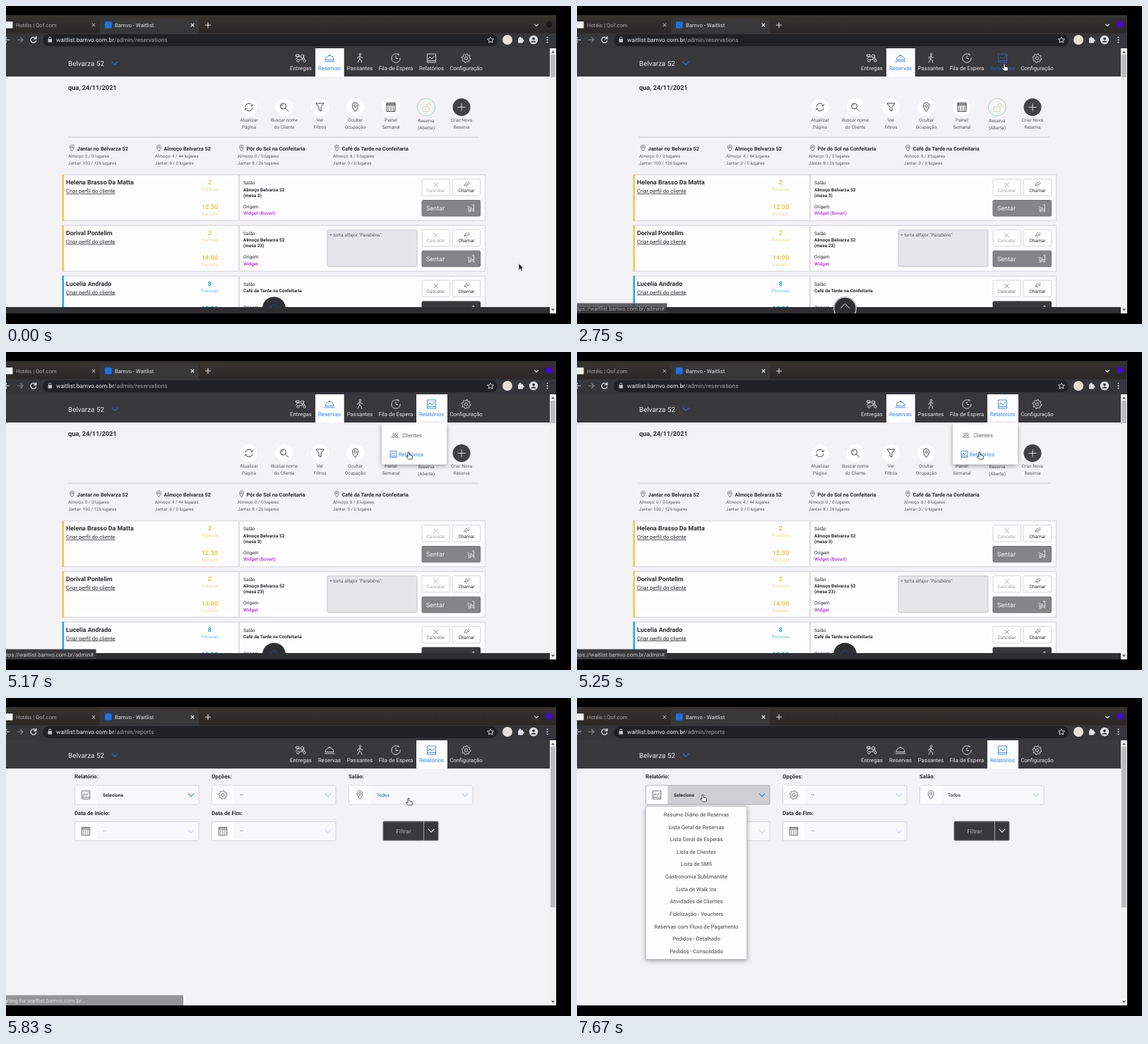
Animation, 800 px wide and 451 px high, one loop 8000 ms. Source, as an HTML page:

```html
<!DOCTYPE html>
<html lang="pt-BR">
<head>
<meta charset="utf-8">
<title>Waitlist</title>
<style>
html, body { margin: 0; height: 100%; overflow: hidden; background: #000; }
svg { display: block; }
text { font-family: Roboto, "Open Sans", sans-serif; text-rendering: geometricPrecision; white-space: pre; }
.shadow { filter: drop-shadow(0 2px 3px rgba(0,0,0,.35)); }
</style>
</head>
<body>
<svg width="800" height="451" viewBox="0 0 800 451">
  <clipPath id="view"><rect y="60" width="770" height="376"/></clipPath>
  <linearGradient id="strip" x2="0" y2="1"><stop stop-color="#37332f"/><stop offset="1" stop-color="#2a2725"/></linearGradient>
  <g id="chrome"></g>
  <g id="page" clip-path="url(#view)"></g>
  <g id="over"></g>
</svg>
<script>
const LOOP = 8000, NAV = 5540, LOADED = 5790;
const DARK = '#39383b', BLUE = '#2a80ff', INK = '#2c2b2e', GREY = '#5a595d', LINE = '#d6d5da';
const HOST = 'waitlist.bamvo.com.br', VENUE = 'Belvarza 52';

// Timing
const ease = (t, a, b) => {
  const u = Math.min(1, Math.max(0, (t - a) / (b - a)));
  return u * u * (3 - 2 * u);
};
const mix = (a, b, k) => '#' + [1, 3, 5].map(i => {
  const [p, q] = [a, b].map(c => parseInt(c.slice(i, i + 2), 16));
  return Math.round(p + (q - p) * k).toString(16).padStart(2, '0');
}).join('');

// Drawing
const text = (x, y, s, size, fill = INK, weight = 400, anchor = 'start', extra = '') =>
  `<text x="${x}" y="${y}" font-size="${size}" fill="${fill}" font-weight="${weight}" text-anchor="${anchor}" ${extra}>${s}</text>`;
const mid = (x, y, s, size, fill, weight) => text(x, y, s, size, fill, weight, 'middle');
const rect = (x, y, w, h, fill, extra = '') =>
  `<rect x="${x}" y="${y}" width="${w}" height="${h}" fill="${fill}" ${extra}/>`;
const box = (x, y, w, h, fill, stroke = LINE, rx = 1.5) =>
  rect(x + .5, y + .5, w - 1, h - 1, fill, `stroke="${stroke}" rx="${rx}"`);
const disc = (x, y, r, fill, extra = '') => `<circle cx="${x}" cy="${y}" r="${r}" fill="${fill}" ${extra}/>`;
const group = (opacity, s) => opacity > 0 ? `<g opacity="${opacity.toFixed(2)}">${s}</g>` : '';

const ring = (r, x = 0, y = 0) => `M${x - r} ${y}a${r} ${r} 0 1 0 ${2 * r} 0a${r} ${r} 0 1 0 ${-2 * r} 0`;
const cog = 'M' + Array.from({ length: 32 }, (_, i) => {
  const a = (i + .5) * Math.PI / 16, r = i % 4 < 2 ? 6.4 : 4.9;
  return `${(r * Math.cos(a)).toFixed(1)} ${(r * Math.sin(a)).toFixed(1)}`;
}).join('L') + 'Z';
const dots = y => `M-4.4 ${y}h2m1.4 0h2m1.4 0h2`;
const ICONS = {
  scooter: ring(1.7, -4, 3.5) + ring(1.7, 5, 3.5) + 'M-7 1.5Q-6-2-3-2H1L2 2H-2.3M2 2L4.5-4H2.5M5 1.5L4-2M-7-5H-2.5V-2.5H-7ZM-1-2.5L1-5H3',
  cloche: 'M-6 2.5A6 6 0 0 1 6 2.5ZM-7.3 4.8H7.3M-1-3.6A1 1 0 0 1 1-3.6',
  walker: ring(1.3, .5, -5.5) + 'M.3-3.6L-.3 1L-3 6.5M-.3 1L2 3L2.8 6.5M.3-3.4L-2.6-1.4L-3.2 1M.6-3L2.2-1L4-.4',
  clock: 'M3-5.4A6.2 6.2 0 1 0 6.2-.5M3-7V-5H5.2M0-3.5V.5H3',
  chart: 'M-6-6H6V6H-6ZM-6 3.6H6M-4.5 1.5L-2.5-2L.5 1L4.5-3.5',
  gear: cog + ring(2.2),
  refresh: 'M-5.2-1A5.3 5.3 0 0 1 4.6-2.6M5.2 1A5.3 5.3 0 0 1-4.6 2.6M3-2.2L5-2L5.6-4M-3 2.2L-5 2L-5.6 4',
  search: ring(4, -1.5, -1.5) + 'M1.5 1.5L6 6M-3.5-2A2.2 2.2 0 0 1-1.5-3.8',
  filter: 'M-5.5-5.5H5.5L1.5 0V5.5L-1.5 4V0Z',
  pin: 'M0 6.2C-6-.8-4.8-6.2 0-6.2S6-.8 0 6.2Z' + ring(1.7, 0, -1.8),
  calendar: 'M-6-6H6V6H-6ZM-6-2.8H6M-6-4.4H6' + dots(-.4) + dots(1.8) + dots(4),
  lock: 'M-5-.5H4V6H-5ZM1-.5V-3A2.7 2.7 0 0 1 6.2-3V-1M-.5 2V4',
  plus: 'M-5.5 0H5.5M0-5.5V5.5',
  cross: 'M-3-3L3 3M3-3L-3 3',
  bell: 'M-4 2L0-4L4 0ZM-1 3L1 4M3-4L5-5M4-2H6',
  chair: 'M5-6V1H-1M5 1V6M-1 1V6M-1 3.5H5M-5-3L-1-1H2M-5 0L-3 1V6M2-5L5-6',
  people: ring(2, -2.5, -2) + ring(2, 2.5, -2) + 'M-6 4Q-5.5 1-2.5 1T1 4ZM2 1Q5.5 1 6 4H1',
  down: 'M-4.2-2.1L0 2.1L4.2-2.1',
  up: 'M-6.500 3.300L0-3.300L6.500 3.300'
};
const icon = (name, x, y, color, scale = 1, width = .9) =>
  `<path transform="translate(${x} ${y}) scale(${scale})" d="${ICONS[name]}" fill="none" stroke="${color}" stroke-width="${width}"/>`;
const stroke = (d, color, width = 1.2) => `<path d="${d}" fill="none" stroke="${color}" stroke-width="${width}"/>`;

function browser(path, live, thumb) {
  const soft = '#dfe1e5';
  return rect(0, 13, 779, 26, 'url(#strip)')
    + '<path d="M130 39Q133 39 133 36V20Q133 16.500 137 16.500H269Q273 16.500 273 20V36Q273 39 276 39Z" fill="#383839"/>'
    + rect(0, 38.5, 779, 21.5, '#35363a')
    + rect(0, 22, 9.5, 9.5, '#f4f4f4') + text(14, 29.5, 'Hotéis | Qof.com', 7.7, '#a3a6aa')
    + rect(140, 22, 9.5, 9.5, '#1a73e8', 'rx="1.500"') + text(154, 29.5, 'Bamvo - Waitlist', 7.7, soft)
    + icon('cross', 124, 27, '#b0b2b5', .75, 1.4) + icon('cross', 264, 27, soft, .75, 1.5)
    + icon('plus', 286, 27, soft, .7, 1.6) + icon('down', 751, 27, soft, .7, 1.5)
    + disc(769, 25.8, 4.4, live ? '#4400f5' : '#17171a')
    + stroke('M-3 48H5.500M1 44.500L-3 48L1 51.500', soft)
    + stroke('M16 48H24M20.500 44.500L24 48L20.500 51.500', '#85878b')
    + stroke('M42 45.500A4 4 0 1 0 42.800 49M42.800 43V46.500H39.300', soft, 1.3)
    + rect(52, 40, 644, 17, '#202124', 'rx="8.500"')
    + rect(59.5, 47, 5.5, 4.5, '#c3c5c9') + stroke('M60.700 47V45.500A1.550 1.550 0 0 1 63.800 45.500V47', '#c3c5c9', 1)
    + text(71, 51, `${HOST}<tspan fill="#a0a3a8">/admin/${path}</tspan>`, 8.3, '#eceef1')
    + stroke('M686 43.800L687.300 46.700L690.500 47L688 49L688.800 52L686 50.400L683.200 52L684 49L681.500 47L684.700 46.700Z', soft, .9)
    + disc(710, 48, 7, '#e6e1d6')
    + rect(725, 45.5, 7, 7, soft, 'rx="1"') + disc(728, 45, 1.5, soft) + disc(732.3, 49, 1.5, soft)
    + disc(747, 48, 6.2, soft) + disc(747, 46.3, 1.9, '#35363a')
    + '<path d="M743 51.500Q747 46.800 751 51.500Z" fill="#35363a"/>'
    + [44.5, 48, 51.5].map(y => disc(766.5, y, 1, soft)).join('')
    + rect(770, 60, 9, 376, '#f1f1f2') + rect(771, 69, 7, thumb, '#bcbcbf')
    + '<path d="M772 66.500H777L774.500 63.500ZM772 429.500H777L774.500 432.500Z" fill="#555"/>';
}

const NAV_ITEMS = [
  ['Entregas', 417.5, 'scooter'], ['Reservas', 458, 'cloche'], ['Passantes', 501, 'walker'],
  ['Fila de Espera', 552, 'clock'], ['Relatórios', 602.5, 'chart'], ['Configuração', 651.5, 'gear']
];
function header(active, hover = 0, lit = 0) {
  return rect(0, 60, 770, 40, DARK) + text(88, 85, VENUE, 9.9, '#e6e6e8') + icon('down', 154, 81, '#2470e6', 1, 1.3)
    + NAV_ITEMS.map(([label, x, name]) => {
      const on = label === active, tab = label === 'Relatórios';
      const back = on ? 1 : tab ? lit : 0;
      const color = on ? BLUE : tab ? mix('#e8e8ea', mix('#1c5ccc', BLUE, lit), hover) : '#e8e8ea';
      return group(back, rect(x - (tab ? 21.5 : 20), 60, tab ? 44 : 40.7, 40, '#fefefe'))
        + icon(name, x, 74, color) + mid(x, 91, label, 7.85, color);
    }).join('');
}

const ACTIONS = [
  [344, 'refresh', 'Atualizar', 'Página'], [394, 'search', 'Buscar nome', 'do Cliente'], [444.5, 'filter', 'Ver', 'Filtros'],
  [494.5, 'pin', 'Ocultar', 'Ocupação'], [545, 'calendar', 'Painel', 'Semanal'], [595, 'lock', 'Reserva', '(Aberta)'],
  [645, 'plus', 'Criar Nova', 'Reserva']
];
const action = ([x, name, a, b]) => {
  const lock = name === 'lock', plus = name === 'plus', dy = lock ? 1 : 0;
  return disc(x, 143.5, 12.5, plus ? '#424144' : lock ? '#f3f6f3' : '#fff', lock ? 'stroke="#a9d6c6"' : '')
    + icon(name, x, 143.5, lock ? '#cfdcb0' : plus ? '#e8e8ea' : INK)
    + mid(x, 164 + dy, a, 6.5, GREY) + mid(x, 174 + dy, b, 6.5, GREY);
};

const HALLS = [
  [88, 'Jantar no ' + VENUE, '0 / 0', '100 / 126'], [211, 'Almoço ' + VENUE, '4 / 44', '0 / 0'],
  [328, 'Pôr do Sol na Confeitaria', '0 / 0', '8 / 26'], [463, 'Café da Tarde na Confeitaria', '8 / 8', '0 / 0']
];
const hall = ([x, name, lunch, dinner]) => icon('pin', x + 5.5, 201.5, GREY, .7, 1.1)
  + text(x + 12.5, 204.5, name, 7.4, INK, 700)
  + text(x, 215, `Almoço: ${lunch} lugares`, 6.15, GREY) + text(x, 225, `Jantar: ${dinner} lugares`, 6.15, GREY);

const CARDS = [
  { y: 239, name: 'Helena Brasso Da Matta', seats: 2, time: '12:30', place: 'Almoço ' + VENUE, table: '(mesa 3)', from: 'Widget (Bovari)' },
  { y: 310.7, name: 'Dorival Pontelim', seats: 2, time: '14:00', place: 'Almoço ' + VENUE, table: '(mesa 23)', from: 'Widget', note: '+ torta alfajor "Parabéns"' },
  { y: 382.5, name: 'Lucelia Andrado', seats: 8, time: '15:00', place: 'Café da Tarde na Confeitaria', table: '', from: '', open: true }
];
const card = c => {
  const tone = c.open ? '#27a9e0' : '#f3c946', pale = c.open ? '#6fc3e6' : '#f6dc8c', faded = c.open ? '#77767a' : '#a9a8ac';
  return `<g transform="translate(0 ${c.y})">`
    + rect(80.5, .5, 598, 65, '#fdfdfe', 'stroke="#dedde2" stroke-width="1.500"') + rect(79.5, 0, 2.6, 66, tone)
    + rect(329, 0, 2, 66, '#dedde2')
    + text(85, 14, c.name, 8.85, INK, 700)
    + text(85, 26, 'Criar perfil do cliente', 7.6, INK, 400, 'start', 'text-decoration="underline"')
    + mid(288.5, 14, c.seats, 9.2, tone, 700) + mid(288.5, 23, 'Pessoas', 6.5, pale)
    + mid(288.5, 49, c.time, 9, tone, 700) + mid(288.5, 58, 'Sentado', 6.5, pale)
    + text(336, 14, 'Salão', 6.7, INK) + text(336, 23.5, c.place, 6.5, INK, 700) + text(336, 31.5, c.table, 6.5, INK, 700)
    + text(336, 47.5, 'Origem', 6.7, INK) + text(336, 57, c.from, 6.6, '#c544ec', 700)
    + (c.note ? box(454.5, 6.5, 128, 52.5, '#e6e5e8', '#c3c2c7') + text(458, 16.5, c.note, 6.65, GREY) : '')
    + box(588.5, 6, 40.5, 24.5, '#fefefe') + icon('cross', 608.5, 14.5, faded) + mid(608.5, 24.5, 'Cancelar', 6.6, faded)
    + box(631.5, 6, 40.5, 24.5, '#fefefe') + icon('bell', 652, 14, GREY, .8) + mid(652, 24.5, 'Chamar', 6.6, INK)
    + box(588.5, 36, 83.5, 23.5, c.open ? DARK : '#858487', c.open ? DARK : '#737276')
    + text(595, 51.3, 'Sentar', 9, '#f4f4f5') + icon('chair', 658, 48, '#f4f4f5', .9) + '</g>';
};
const LIST = rect(0, 60, 770, 376, '#f3f2f5') + text(88, 118.5, 'qua, 24/11/2021', 9.2, INK, 700)
  + ACTIONS.map(action).join('') + rect(88, 185.5, 582, 1, '#c9c8cd') + HALLS.map(hall).join('') + CARDS.map(card).join('');

function listPage(t, y) {
  const lit = ease(t, 2760, 2920);
  const white = ease(t, 250, 650) * (1 - ease(t, 3040, 3350));
  const halo = ease(t, 540, 660) * (1 - ease(t, 3900, 4500));
  const entry = (name, label, ix, tx, cy, on) =>
    icon(name, ix, cy, on ? BLUE : '#77767a', .75, 1.1) + text(tx, cy + 3, label, 7.8, on ? BLUE : '#66656a');
  return LIST + header('Reservas', ease(t, 2480, 2790), lit)
    + rect(0, 427, 770, 9, '#2f2e31') + disc(379.5, 429, 16.5, '#2f2e31')
    + group(halo, disc(379.5, 429, 15.7, 'none', 'stroke="#f0f0f2" stroke-width="1.100"'))
    + icon('up', 379.5, 425.5, mix('#1c4796', '#f0f0f2', white), 1, 1)
    + group(lit, rect(532, 100, 92, 59.5, '#fefefe', 'class="shadow"')
      + entry('people', 'Clientes', 551, 561, 118, y > 107 && y < 131)
      + entry('chart', 'Relatórios', 548.5, 556, 145, y >= 131));
}

const REPORTS = ['Resumo Diário de Reservas', 'Lista Geral de Reservas', 'Lista Geral de Esperas', 'Lista de Clientes', 'Lista de SMS',
  'Gastronomia Sublimantité', 'Lista de Walk Ins', 'Atividades de Clientes', 'Fidelização - Vouchers',
  'Reservas com Fluxo de Pagamento', 'Pedidos - Detalhado', 'Pedidos - Consolidado'];
const field = (x, y, label, name, value, color, arrow, back = '#f8f8fa') =>
  text(x, y - 9.3, label, 7.75, INK, 700) + box(x, y, 176.5, 28, back, back === '#f8f8fa' ? LINE : '#aeadb2')
  + rect(x + 1, y + 1, 30.5, 26, '#fdfdfe') + icon(name, x + 16, y + 14, GREY, .95)
  + text(x + 40, y + 16.3, value, value === '--' ? 9 : 6.6, color, value === '--' ? 400 : 700)
  + icon('down', x + 165, y + 14, arrow, 1, 1.1);

function reportsPage(t, x) {
  const loading = t < LOADED, pale = '#b4cdf0';
  const hover = ease(t, 6950, 7080), menu = ease(t, 7360, 7560);
  return rect(0, 60, 770, 376, '#f3f2f5')
    + (loading ? rect(0, 60, 770, 29, DARK) : header('Relatórios'))
    + field(97, 123.5, 'Relatório:', 'chart', 'Selecione', INK, '#3d7be0', hover ? mix('#f8f8fa', '#cfced2', hover) : undefined)
    + field(291, 123.5, 'Opções:', 'gear', '--', GREY, pale)
    + field(485, 123.5, 'Salão:', 'pin', 'Todos', !loading && x > 485 ? '#3f92f5' : GREY, pale)
    + field(97, 175, 'Data de Início:', 'calendar', '--', '#88878b', '#cfdcf2')
    + field(291, 175, 'Data de Fim:', 'calendar', '--', '#88878b', '#cfdcf2')
    + box(533.5, 174.5, 79, 28, DARK, '#77767a') + rect(591, 175, 1, 27, '#a2a1a5')
    + mid(563, 191.7, 'Filtrar', 8.4, '#b4b3b7') + icon('down', 602, 188, '#f0f0f2', 1, 1.1)
    + group(menu, box(97, 153, 144, 218, '#fefefe', '#c4c3c8').replace('<rect', '<rect class="shadow"')
      + REPORTS.map((s, i) => mid(169, 168 + i * 17.62, s, 7.6, '#444347')).join(''))
    + (loading ? rect(0, 60, 770, 376, '#000', 'opacity=".59"') + spinner(t) : '');
}
function spinner(t) {
  const step = Math.floor(t / 100) + 3;
  return Array.from({ length: 8 }, (_, i) =>
    `<path transform="translate(380 248) rotate(${i * 45})" d="M0-9V-15" stroke="#0d5cff" stroke-width="3" stroke-linecap="round" opacity="${1 - (step - i) % 8 / 9}"/>`).join('');
}

function status(t) {
  const bar = (w, x, s) => rect(0, 421.5, w, 14.5, '#3a3a3d') + text(x, 431.5, s, 7.7, '#c9c9cc', 400, 'end');
  if (t < 5400) return group(ease(t, 2480, 2860), bar(127.5, 124, `https://${HOST}/admin#`));
  return group(t < LOADED ? 1 : t < 5880 ? .5 : 0, bar(251, 112, `Waiting for ${HOST}...`));
}

// Pointer legs: start, end, dx, dy
const LEGS = [[1370, 2470, -121, -283], [3850, 4800, -35, 60], [6290, 7170, -392, -5]];
const pointer = t => LEGS.reduce(([x, y], [a, b, dx, dy]) => {
  const k = ease(t, a, b);
  return [x + dx * k, y + dy * k];
}, [726, 365]);
const cursor = (x, y, hand) => `<path transform="translate(${x.toFixed(1)} ${y.toFixed(1)})" stroke-width=".8" ` + (hand
  ? 'fill="#fff" stroke="#222" d="M-1 .8A1 1 0 0 1 1 .8V4L4 4.600Q5.600 5 5.400 6.600L5 10H-.5L-3.500 6.500Q-3.200 5.200-2 5.900L-1 6.800Z"/>'
  : 'fill="#1a1a1a" stroke="#ddd" d="M0 0V9.500L2.200 7.500L3.800 11L5.300 10.400L3.800 7H6.500Z"/>');

const shown = {};
function put(id, markup) {
  if (shown[id] !== markup) document.getElementById(id).innerHTML = shown[id] = markup;
}
function draw(now) {
  const t = now % LOOP, [x, y] = pointer(t), reports = t >= NAV;
  put('chrome', browser(reports ? 'reports' : 'reservations', t > 560, reports ? 228 : 32));
  put('page', reports ? reportsPage(t, x) : listPage(t, y));
  put('over', status(t) + cursor(x, y, t > 2300 && (y < 99 || t > 2470)));
  requestAnimationFrame(draw);
}
draw(0);
</script>
</body>
</html>
```
